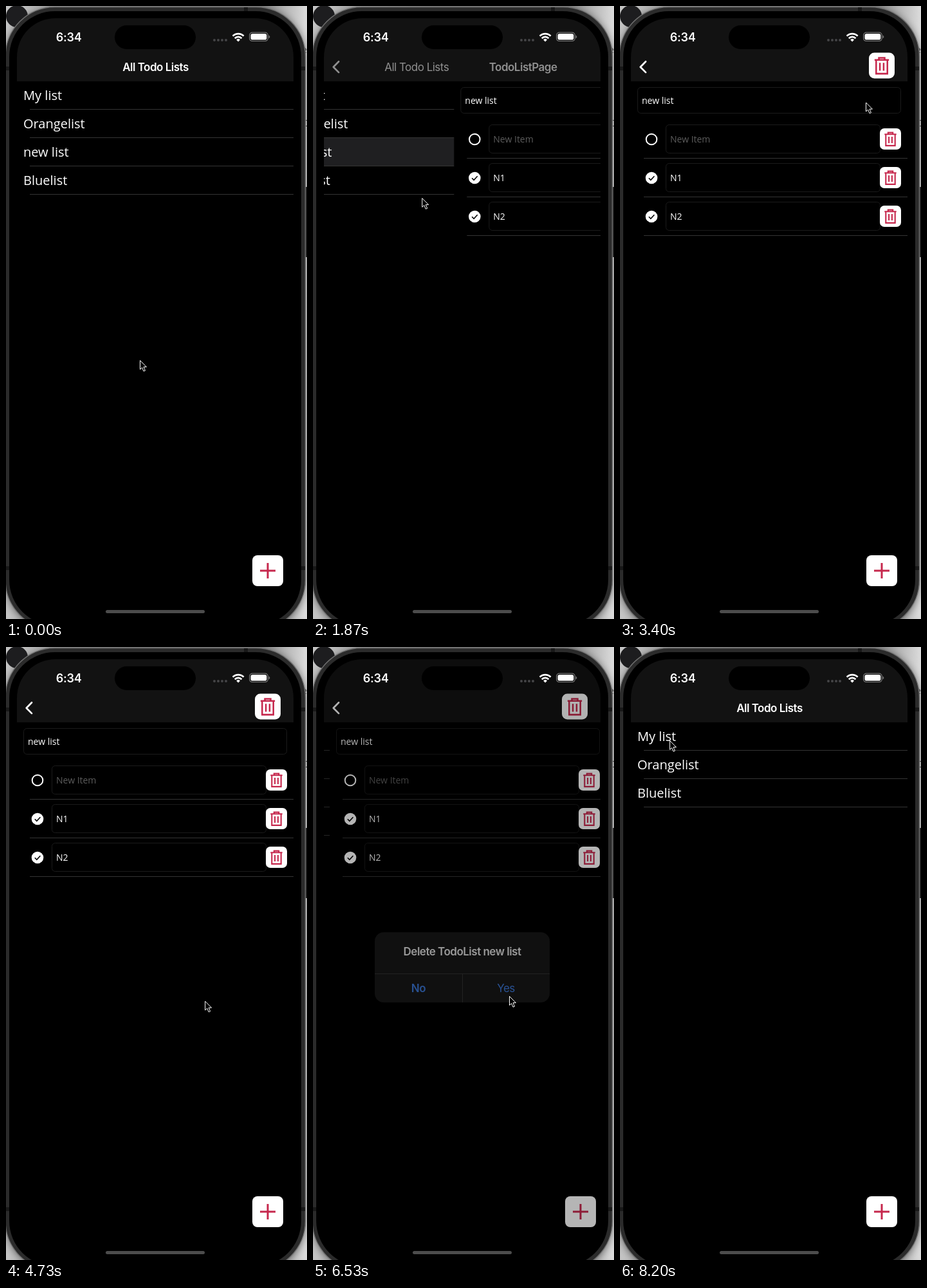
Recreate the animation shown at these times as an HTML page. Size 468 by 952 pixels, loop 8270 ms.

```html
<!DOCTYPE html>
<html lang="en">
<head>
<meta charset="utf-8">
<title>Todo lists</title>
<style>
html, body { margin: 0; width: 100%; height: 100%; overflow: hidden; background: #aaa; }
svg { display: block; width: 468px; height: 952px; }
.ui { font: 600 17px Inter, "Liberation Sans", sans-serif; letter-spacing: -.5px; fill: #fff; }
.plain { font-weight: 400; }
.mid { text-anchor: middle; }
.blue { fill: #4386f2; }
.row { font: 20px "Open Sans", "Noto Sans", sans-serif; fill: #fff; }
.field { font: 14px "Open Sans", "Noto Sans", sans-serif; fill: #fff; }
.hint { fill: #5c5c5c; }
.line { fill: #343434; }
.box { fill: none; stroke: #1b1b1b; }
.red { fill: none; stroke: #c6284d; }
</style>
</head>
<body>
<svg viewBox="0 0 468 952">
  <defs>
    <linearGradient id="desk" x1="0" x2="1" y1="0" y2="0">
      <stop offset="0" stop-color="#c4c4c4"/>
      <stop offset=".4" stop-color="#8a8a8a"/>
      <stop offset=".85" stop-color="#8a8a8a"/>
      <stop offset="1" stop-color="#dcdcdc"/>
    </linearGradient>
    <filter id="soft" x="-10%" width="120%" y="-5%" height="110%"><feGaussianBlur stdDeviation="6"/></filter>
    <clipPath id="screen"><rect x="17" y="19" width="430" height="932" rx="60"/></clipPath>
    <g id="trash">
      <rect width="33" height="33" rx="7" fill="#fff"/>
      <path class="red" stroke-width="2.1" d="M7.3 9.2H25.7M12.8 9V6.6H20.2V9M9.3 9.2V26.9H23.7V9.2M14.1 13V23M18.9 13V23"/>
    </g>
    <g id="add">
      <rect x="383" y="853" width="48" height="48" rx="8" fill="#fff"/>
      <path class="red" stroke-width="3" d="M395 877H419M407 865V889"/>
    </g>
    <g id="item">
      <rect class="box" x="71.5" y="184.5" width="333" height="44" rx="5"/>
      <use href="#trash" x="404" y="190"/>
      <rect class="line" x="37" y="236" width="410" height="1"/>
    </g>
    <g id="done">
      <circle cx="49" cy="207" r="9.3" fill="#fff"/>
      <path d="M44.8 207.3L47.8 210.3L53.4 204.2" fill="none" stroke="#000" stroke-width="1.6"/>
    </g>
    <rect id="rule" class="line" x="37" width="410" height="1"/>
  </defs>

  <!-- desktop and phone body -->
  <rect width="468" height="952" fill="url(#desk)"/>
  <rect x="-1" y="3" width="467" height="968" rx="77" filter="url(#soft)" opacity=".45"/>
  <circle cx="17" cy="16" r="17" fill="#1d1d1f"/>
  <g class="field" style="fill:#333"><text x="460" y="73">e</text><text x="461" y="187">C</text></g>
  <rect x="464" y="281" width="4" height="109" fill="#1c1c1c"/>
  <rect x="-1" y="1.5" width="466.5" height="967" rx="77" fill="#2b2b2b" stroke="#707070" stroke-width="1.5"/>
  <path d="M370 2h6v7h-6zM0 94h6v6h-6zM458 94h7v6h-7zM0 870h6v6h-6zM458 870h7v6h-7z" fill="#181818"/>
  <rect x="5" y="8" width="454" height="954" rx="71"/>

  <g clip-path="url(#screen)">
    <g id="list">
      <rect id="pick" x="17" y="205" width="430" height="43" fill="#3a3a3c"/>
      <text class="row" x="27" y="146">My list</text>
      <use href="#rule" y="160"/>
      <text class="row" x="27" y="190">Orangelist</text>
      <use href="#rule" y="204"/>
      <g id="gone">
        <text class="row" x="27" y="234">new list</text>
        <use href="#rule" y="248"/>
      </g>
      <g id="last">
        <use href="#rule" y="248"/>
        <text class="row" x="27" y="278">Bluelist</text>
        <use href="#rule" y="292"/>
      </g>
      <use href="#add"/>
    </g>

    <g id="page">
      <rect x="17" y="117" width="430" height="834"/>
      <rect class="box" x="27.5" y="126.5" width="409" height="40" rx="5"/>
      <text class="field" x="34" y="152">new list</text>
      <use href="#item"/>
      <circle cx="49" cy="207" r="8.3" fill="none" stroke="#fff" stroke-width="2"/>
      <text class="field hint" x="78" y="212">New Item</text>
      <use href="#item" y="60"/>
      <use href="#done" y="60"/>
      <text class="field" x="78" y="272">N1</text>
      <use href="#item" y="120"/>
      <use href="#done" y="120"/>
      <text class="field" x="78" y="332">N2</text>
      <use href="#add"/>
    </g>

    <rect x="17" y="19" width="430" height="98" fill="#121212"/>
    <text id="home" class="ui mid" x="232.5" y="101">All Todo Lists</text>
    <text id="back" class="ui plain" x="50" y="101">All Todo Lists</text>
    <text id="name" class="ui mid" x="232.5" y="101">TodoListPage</text>
    <path id="arrow" d="M40 86.3L31.7 94.7L40 103.1" fill="none" stroke="#fff" stroke-width="2.7" stroke-linecap="round" stroke-linejoin="round"/>
    <g id="bin"><use href="#trash" transform="translate(387 72.5) scale(1.212)"/></g>
    <rect id="dim" x="17" y="19" width="430" height="932"/>
  </g>

  <!-- status bar -->
  <rect x="169" y="30" width="126" height="37" rx="18.5"/>
  <text class="ui mid" x="97.7" y="54.6" style="font-size:18px;letter-spacing:-.2px">6:34</text>
  <g fill="#454547">
    <circle cx="324" cy="53" r="2"/><circle cx="330" cy="53" r="2"/><circle cx="336" cy="53" r="2"/><circle cx="342" cy="53" r="2"/>
  </g>
  <path d="M352.6 46.6a11.9 11.9 0 0 1 17 0M355.8 50.2a7.4 7.4 0 0 1 10.6 0" fill="none" stroke="#fff" stroke-width="2.7"/>
  <path d="M361.1 55.4l-2.9-3a4.2 4.2 0 0 1 5.8 0z" fill="#fff"/>
  <rect x="378.6" y="41.1" width="28.6" height="13.4" rx="4.4" fill="none" stroke="#7a7a7a" stroke-width="1.2"/>
  <rect x="380.5" y="43" width="24.8" height="9.6" rx="2.8" fill="#fff"/>
  <path d="M408.6 45.6a2.4 2.4 0 0 1 0 4.6z" fill="#7a7a7a"/>

  <g id="alert">
    <rect x="96" y="443" width="272" height="109" rx="14" fill="#1c1c1c"/>
    <path d="M96 507.5H368M232.5 507V552" stroke="#393939"/>
    <text class="ui mid" x="232" y="479">Delete TodoList new list</text>
    <text class="ui mid blue" x="164" y="536">No</text>
    <text class="ui mid blue plain" x="300" y="536">Yes</text>
  </g>

  <rect x="155" y="938" width="154" height="5" rx="2.5" fill="#4c4c4c"/>
  <path id="mouse" d="M.5 .5V14.3L3.6 11.5L6 17.2L8.4 16.2L6 10.6H10.4Z" stroke="#fff" stroke-linejoin="round"/>
</svg>
<script>
const LOOP = 8270, STEP = 200 / 3;
const el = {};
for (const node of document.querySelectorAll("svg [id]")) el[node.id] = node;

// time, x, y of the pointer tip
const trail = [
  [0, 208, 550], [200, 196, 557], [610, 196, 557], [870, 158, 400],
  [1070, 129, 240], [1200, 147, 211], [1330, 150, 207], [1470, 148, 214],
  [1730, 148, 214], [2000, 190, 380], [2200, 224, 490], [2400, 224, 490],
  [2530, 223, 492], [3010, 223, 492], [3270, 330, 260], [3470, 410, 90],
  [3670, 440, 180], [3870, 409, 329], [4000, 340, 470], [4130, 309, 550],
  [4670, 309, 550], [4733, 309, 550], [4930, 400, 330], [5070, 454, 180],
  [5200, 430, 78], [5330, 402, 91], [5740, 402, 91], [5900, 375, 220],
  [6130, 315, 490], [6270, 303, 543], [6330, 305, 542], [7400, 305, 542],
  [7700, 220, 350], [8000, 100, 175], [8200, 77, 145], [LOOP, 77, 145]
];

const span = (t, from, to) => Math.min(1, Math.max(0, (t - from) / (to - from)));
const easeOut = p => 1 - (1 - p) ** 3;
const smooth = p => p * p * (3 - 2 * p);
const move = (node, x, y = 0) => node.setAttribute("transform", `translate(${x} ${y})`);
const fade = (node, v) => node.setAttribute("opacity", Math.max(0, v));

function pointer(t) {
  const i = Math.max(1, trail.findIndex(k => k[0] >= t));
  const [a, b] = [trail[i - 1], trail[i]];
  const p = span(t, a[0], b[0]);
  return [a[1] + (b[1] - a[1]) * p, a[2] + (b[2] - a[2]) * p];
}

function draw(t) {
  const open = easeOut(span(t, 1740, 2310)) - easeOut(span(t, 6530, 7005));
  const settled = t > 2300;
  move(el.page, 430 * (1 - open));
  fade(el.page, open > 0 ? 1 : 0);
  move(el.list, -129 * open);
  fade(el.pick, t > 1500 && t < 4000 ? 1 - .85 * open : 0);

  move(el.home, -130 * open);
  fade(el.home, 1 - 2 * open);
  move(el.back, 130 * (1 - open));
  fade(el.back, settled ? 0 : open);
  move(el.name, 200 * (1 - open));
  fade(el.name, settled ? 0 : open);
  fade(el.arrow, open);
  const pressed = t > 5440 && t < 6450;
  fade(el.bin, settled ? open * (pressed ? .52 : 1) : 0);

  const shown = easeOut(span(t, 5440, 5700));
  const visible = shown * (1 - smooth(span(t, 6430, 6670)));
  const size = 1.18 - .18 * shown;
  el.alert.setAttribute("transform", `translate(232 497.5) scale(${size}) translate(-232 -497.5)`);
  fade(el.alert, visible);
  fade(el.dim, .48 * visible);

  const removed = smooth(span(t, 7015, 7330));
  fade(el.gone, 1 - removed);
  move(el.last, 0, -44 * removed);
  move(el.mouse, ...pointer(t));
}

const start = performance.now();
function tick() {
  const t = (performance.now() - start) % LOOP;
  draw(Math.floor((t + 5) / STEP) * STEP);
  requestAnimationFrame(tick);
}
tick();
</script>
</body>
</html>
```
